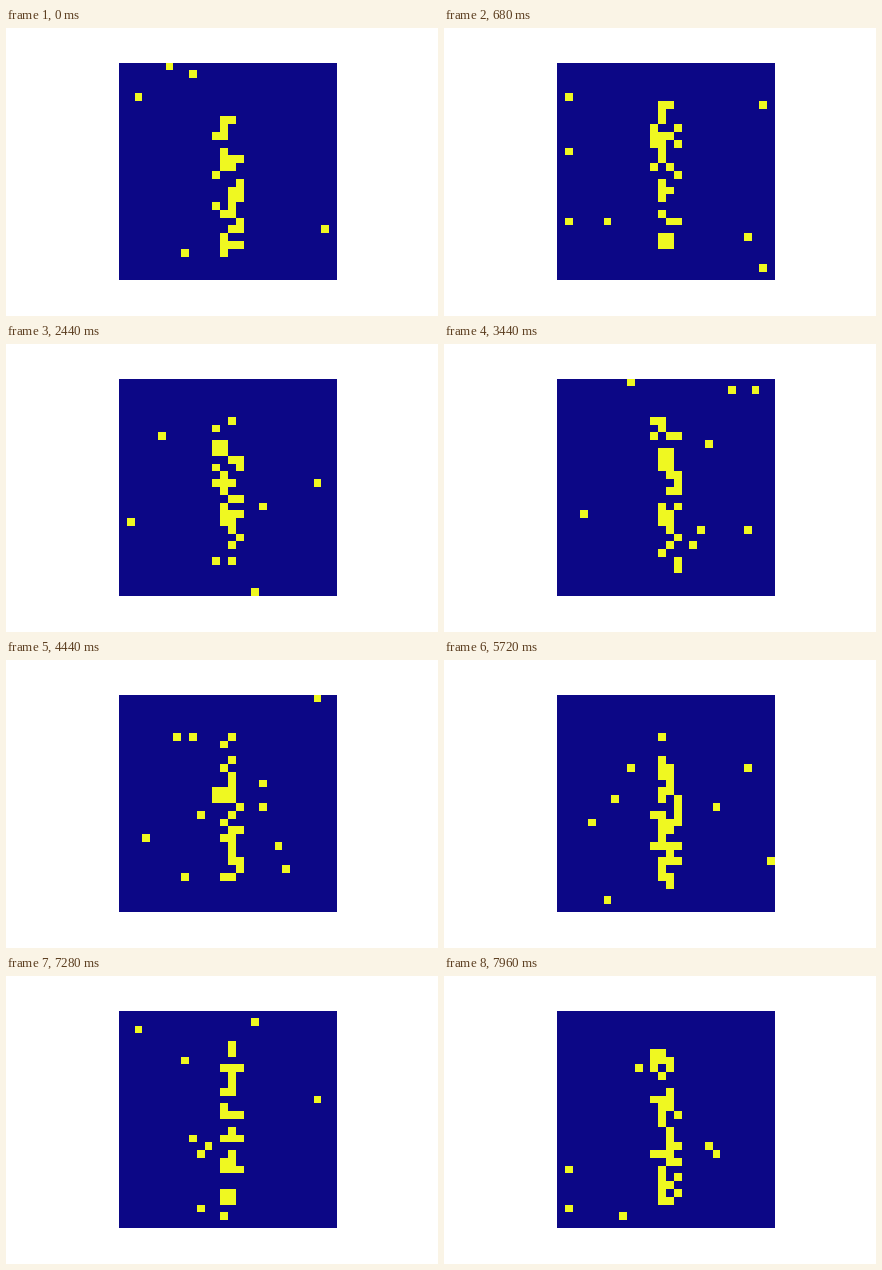
A matplotlib script that plays this animation: 432 by 288 pixels, repeating every 8000 ms.

```python
import numpy as np
import matplotlib.pyplot as plt
from matplotlib.animation import FuncAnimation

FRAMES, STEP_MS, SIZE = 200, 40, 28
NOISE, PEAK = 0.0105, 0.53


def firing_rates():
    """Chance per step that each cell lights up: a slightly slanted bar."""
    row, col = np.mgrid[:SIZE, :SIZE]
    center = np.interp(row, [5, 24], [13.35, 13.95])
    across = np.clip(1.95 - abs(col - center), 0, 1)
    along = np.clip(10.3 - abs(row - 14.5), 0, 1)
    return np.maximum(NOISE, PEAK * across * along)


rng = np.random.default_rng(7)
spikes = rng.random((FRAMES, SIZE, SIZE)) < firing_rates()

fig, ax = plt.subplots(figsize=(6, 4), dpi=72, facecolor="white")
fig.subplots_adjust(left=0.125, right=0.9, bottom=0.125, top=0.88)
ax.axis("off")
image = ax.imshow(spikes[0].astype(float), cmap="plasma", vmin=0, vmax=1,
                  interpolation="nearest")


def update(i):
    image.set_data(spikes[i].astype(float))
    return [image]


anim = FuncAnimation(fig, update, frames=FRAMES, interval=STEP_MS,
                     repeat=True, repeat_delay=0)
plt.show()
```
